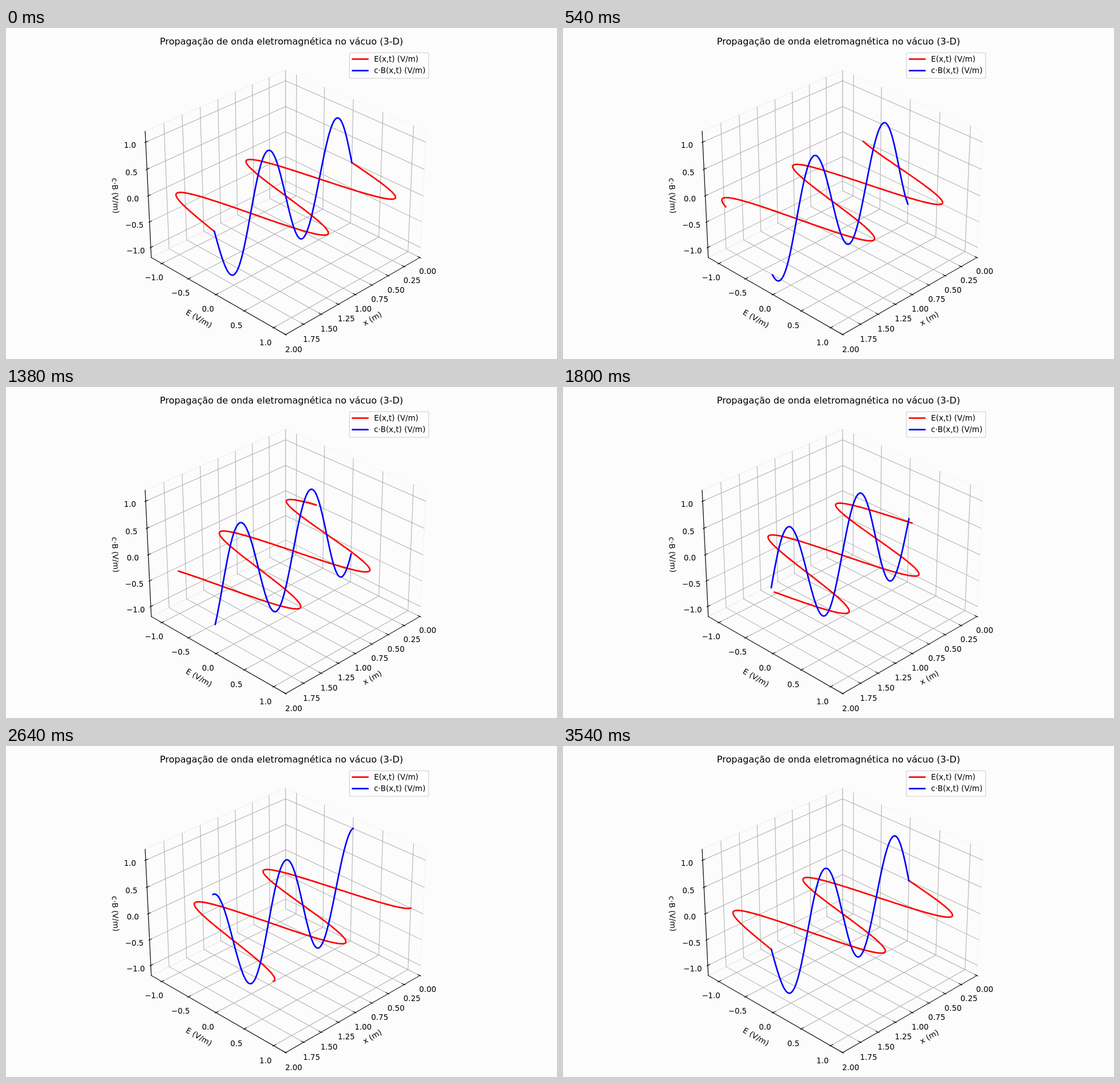
These frames come from a looping animation (966 px wide and 580 px high, 3600 ms). An HTML page with a canvas:

```html
<!DOCTYPE html>
<html lang="pt">
<head>
<meta charset="utf-8">
<title>Onda eletromagnética</title>
<style>
html, body { margin: 0; width: 100%; height: 100%; overflow: hidden; background: #fcfcfc; }
canvas { display: block; }
</style>
</head>
<body>
<canvas id="stage" width="966" height="580"></canvas>
<script>
const ctx = document.getElementById('stage').getContext('2d');
const PT = 1.3417;            // pixels per typographic point
const FONT = 10 * PT;
const STEP_MS = 60, STEPS = 60;
const SIN = 0.5, COS = Math.sqrt(3) / 2;   // camera elevation of 30°
const SIDE = 1.190476, HEIGHT = 0.892857;  // size of the plot box
const LIM = 1.2;
const xTicks = Array.from({ length: 9 }, (_, i) => i / 4);
const yTicks = [-1, -0.5, 0, 0.5, 1];

// Perspective view with x running left-down and y (E) running right-down.
function project([x, y, z]) {
  const bx = (x / 2 - 0.5) * SIDE, by = y / 2.4 * SIDE, bz = z / 2.4 * HEIGHT;
  const across = (by - bx) * Math.SQRT1_2, near = (by + bx) * Math.SQRT1_2;
  const scale = 2860 / (10 - near * COS - bz * SIN);
  return [490.2 + across * scale, 294 - (bz * COS - near * SIN) * scale];
}

function stroke(points, color, width, cap = 'square') {
  ctx.beginPath();
  points.forEach(p => ctx.lineTo(...p));
  ctx.strokeStyle = color;
  ctx.lineWidth = width * PT;
  ctx.lineCap = cap;
  ctx.lineJoin = 'round';
  ctx.stroke();
}

const line3d = (points, ...style) => stroke(points.map(project), ...style);

function text(str, x, y, align = 'center', size = FONT) {
  ctx.font = `${size}px "DejaVu Sans", sans-serif`;
  ctx.textAlign = align;
  ctx.fillStyle = '#000';
  ctx.fillText(str, x, y);
}

// Moves a value outwards by a fraction of its axis range.
const outX = f => 2 + 2 * f;
const outLim = f => LIM + 2 * LIM * f;

const axes = [
  { ticks: xTicks, digits: 2, label: 'x (m)', ends: [2, 0],
    edge: (v, side, down) => [v, outLim(side), -outLim(down)],
    grid: v => [[v, -LIM, LIM], [v, -LIM, -LIM], [v, LIM, -LIM]] },
  { ticks: yTicks, digits: 1, label: 'E (V/m)', ends: [-LIM, LIM],
    edge: (v, side, down) => [outX(side), v, -outLim(down)],
    grid: v => [[0, v, LIM], [0, v, -LIM], [2, v, -LIM]] },
  { ticks: yTicks, digits: 1, label: 'c·B (V/m)', ends: [LIM, -LIM],
    edge: (v, side, back) => [outX(side), -outLim(back), v],
    grid: v => [[2, -LIM, v], [0, -LIM, v], [0, LIM, v]] }
];

function drawPanes() {
  const floor = [[0, -LIM, -LIM], [2, -LIM, -LIM], [2, LIM, -LIM], [0, LIM, -LIM], [0, -LIM, -LIM]];
  const right = [[0, -LIM, -LIM], [0, LIM, -LIM], [0, LIM, LIM], [0, -LIM, LIM], [0, -LIM, -LIM]];
  const left = [[0, -LIM, -LIM], [2, -LIM, -LIM], [2, -LIM, LIM], [0, -LIM, LIM], [0, -LIM, -LIM]];
  line3d(right, 'rgba(242,242,242,.5)', 1);
  line3d(left, 'rgba(230,230,230,.5)', 1);
  line3d(floor, 'rgba(236,236,236,.5)', 1);
}

function drawAxis({ ticks, digits, label, ends, edge }) {
  const [a, b] = ends.map(v => project(edge(v, 0, 0)));
  stroke([a, b], '#000', 0.8);
  for (const v of ticks) {
    line3d([edge(v, 0.008, 0), edge(v, -0.016, 0)], '#000', 0.8, 'butt');
    const [x, y] = project(edge(v, 0.056, 0.056));
    text(v.toFixed(digits).replace('-', '\u2212'), x, y + 0.76 * FONT);
  }
  ctx.save();
  ctx.translate(...project(edge((ends[0] + ends[1]) / 2, 0.1217, 0.1217)));
  ctx.rotate(Math.atan2(b[1] - a[1], b[0] - a[0]));
  text(label, 0, 0.276 * FONT);
  ctx.restore();
}

function drawLegend() {
  ctx.beginPath();
  ctx.roundRect(602.2, 43.4, 138.8, 44.7, 2.7);
  ctx.fillStyle = 'rgba(255,255,255,.8)';
  ctx.fill();
  ctx.strokeStyle = 'rgba(204,204,204,.8)';
  ctx.lineWidth = PT;
  ctx.stroke();
  [['E(x,t) (V/m)', '#f00'], ['c·B(x,t) (V/m)', '#00f']].forEach(([name, color], i) => {
    const base = 59.2 + 20.2 * i;
    stroke([[607.6, base - 4.7], [634.4, base - 4.7]], color, 2);
    text(name, 645.2, base, 'left');
  });
}

function drawWave(toPoint, phase, color) {
  const points = Array.from({ length: 401 }, (_, i) => {
    const x = i / 200;
    return toPoint(x, Math.sin(2 * Math.PI * x - phase));
  });
  line3d(points, color, 2);
}

function draw(now) {
  const step = Math.floor(now / STEP_MS) % STEPS;
  const phase = 2 * Math.PI * step / (STEPS - 1);
  ctx.fillStyle = '#fcfcfc';
  ctx.fillRect(0, 0, 966, 580);
  drawPanes();
  axes.forEach(({ ticks, grid }) => ticks.forEach(v => line3d(grid(v), '#b0b0b0', 0.8)));
  axes.forEach(drawAxis);
  drawWave((x, s) => [x, s, 0], phase, '#f00');
  drawWave((x, s) => [x, 0, s], phase, '#00f');
  text('Propagação de onda eletromagnética no vácuo (3-D)', 483, 28.7, 'center', 12 * PT);
  drawLegend();
}

const start = performance.now();
function tick() {
  draw(performance.now() - start);
  requestAnimationFrame(tick);
}
tick();
</script>
</body>
</html>
```
